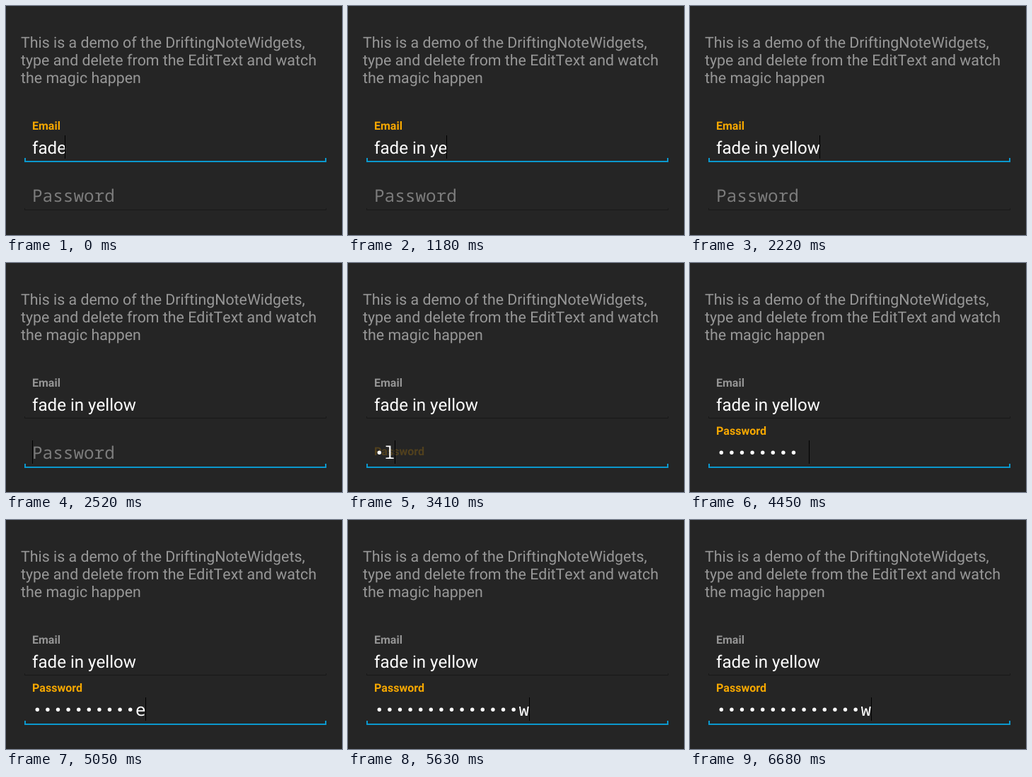
Write an HTML page that moves like this. It is 475 px wide and 324 px high and loops after 6.73 s.

```html
<!DOCTYPE html>
<html lang="en">
<head>
<meta charset="utf-8">
<title>Floating labels</title>
<style>
  html, body { margin: 0; width: 100%; height: 100%; overflow: hidden; background: #252525; }
  svg { display: block; width: 475px; height: 324px; }
  text { white-space: pre; text-rendering: geometricPrecision; font-family: Roboto, sans-serif; font-kerning: none; }
  .intro { font-size: 21.36px; fill: #979797; }
  .label { font-size: 16px; font-weight: 700; fill: #f7a800; }
  .value { font-size: 24.15px; fill: #fff; }
  .mono { font-size: 24.33px; font-family: "Noto Sans Mono", monospace; fill: #fff; }
  .hint { fill: #7c7c7c; }
  .idle { fill: #959595; }
  .line { fill: #191919; }
  .line.focus { fill: #0b98cd; }
</style>
</head>
<body>
<svg viewBox="0 0 475 324">
  <g class="intro">
    <text x="21" y="59">This is a demo of the DriftingNoteWidgets,</text>
    <text x="21" y="84">type and delete from the EditText and watch</text>
    <text x="21" y="109">the magic happen</text>
  </g>

  <text id="emailLabel" class="label" x="37" y="175">Email</text>
  <text id="email" class="value" x="37" y="209"></text>
  <path id="emailLine"/>

  <text id="passLabel" class="label" x="37" y="243.4">Password</text>
  <text id="passHint" class="mono hint" x="37" y="277">Password</text>
  <g id="dots" fill="#fff"></g>
  <text id="lastChar" class="mono" y="277"></text>
  <path id="passLine"/>

  <rect id="cursor" width="1" height="33"/>
</svg>
<script>
const LOOP = 6730, BEAT = 148.3, LEAD = 8;
const FOCUS_BEAT = 17, PASS_BEAT = 23;
const LEFT = 37, PITCH = 14.6;

// One part is typed per beat; empty parts are pauses.
const emailKeys = "fade|| ||i|n| |y|e|l|l|o||||w".split("|");
const passKeys = "sl|i|de| ||in|| |||y|e|l|l|o|w".split("|");

const $ = id => document.getElementById(id);
const typed = (keys, beat) => keys.slice(0, Math.max(0, beat + 1)).join("");
const within = (beat, from, to) => beat >= from && beat < to;
const ease = p => (1 - Math.cos(Math.PI * Math.min(1, Math.max(0, p)))) / 2;

const dots = [...passKeys.join("")].map((_, i) => {
  const dot = document.createElementNS("http://www.w3.org/2000/svg", "circle");
  dot.setAttribute("cx", LEFT + PITCH * (i + 0.5));
  dot.setAttribute("cy", 268.3);
  dot.setAttribute("r", 2.7);
  return $("dots").appendChild(dot);
});

function underline(path, bottom, focused) {
  const [thick, tick] = focused ? [2, 6] : [1, 3];
  const base = focused ? bottom : bottom - 1;
  path.setAttribute("class", focused ? "line focus" : "line");
  path.setAttribute("d", `M26 ${base}v${-tick}h${thick}v${tick - thick}H${453 - thick}v${thick - tick}h${thick}v${tick}z`);
}

function draw(t) {
  const beat = Math.floor((t + LEAD) / BEAT);
  const onPass = beat >= FOCUS_BEAT;

  $("email").textContent = typed(emailKeys, beat);
  $("emailLabel").classList.toggle("idle", onPass);
  underline($("emailLine"), 221, !onPass);
  underline($("passLine"), 290, onPass);

  const pass = typed(passKeys, beat - PASS_BEAT), last = pass.length - 1;
  $("passHint").style.display = pass ? "none" : "";
  dots.forEach((dot, i) => dot.style.display = i < last ? "" : "none");
  $("lastChar").textContent = pass.slice(-1);
  $("lastChar").setAttribute("x", LEFT + PITCH * last);

  // The label rises in steps, one pose per beat.
  const rise = ease((beat - PASS_BEAT + 0.6) / 2);
  $("passLabel").setAttribute("opacity", pass ? rise : 0);
  $("passLabel").setAttribute("transform", `translate(0 ${36 * (1 - rise)})`);

  const end = onPass ? LEFT + PITCH * pass.length : LEFT - 1 + $("email").getComputedTextLength();
  const hidden = within(beat, 20, PASS_BEAT) || within(beat, 41, 45);
  $("cursor").setAttribute("x", Math.floor(end + 0.01));
  $("cursor").setAttribute("y", onPass ? 251 : 183);
  $("cursor").setAttribute("opacity", hidden ? 0 : 1);
}

const start = performance.now();
function tick() {
  draw((performance.now() - start) % LOOP);
  requestAnimationFrame(tick);
}
tick();
</script>
</body>
</html>
```
